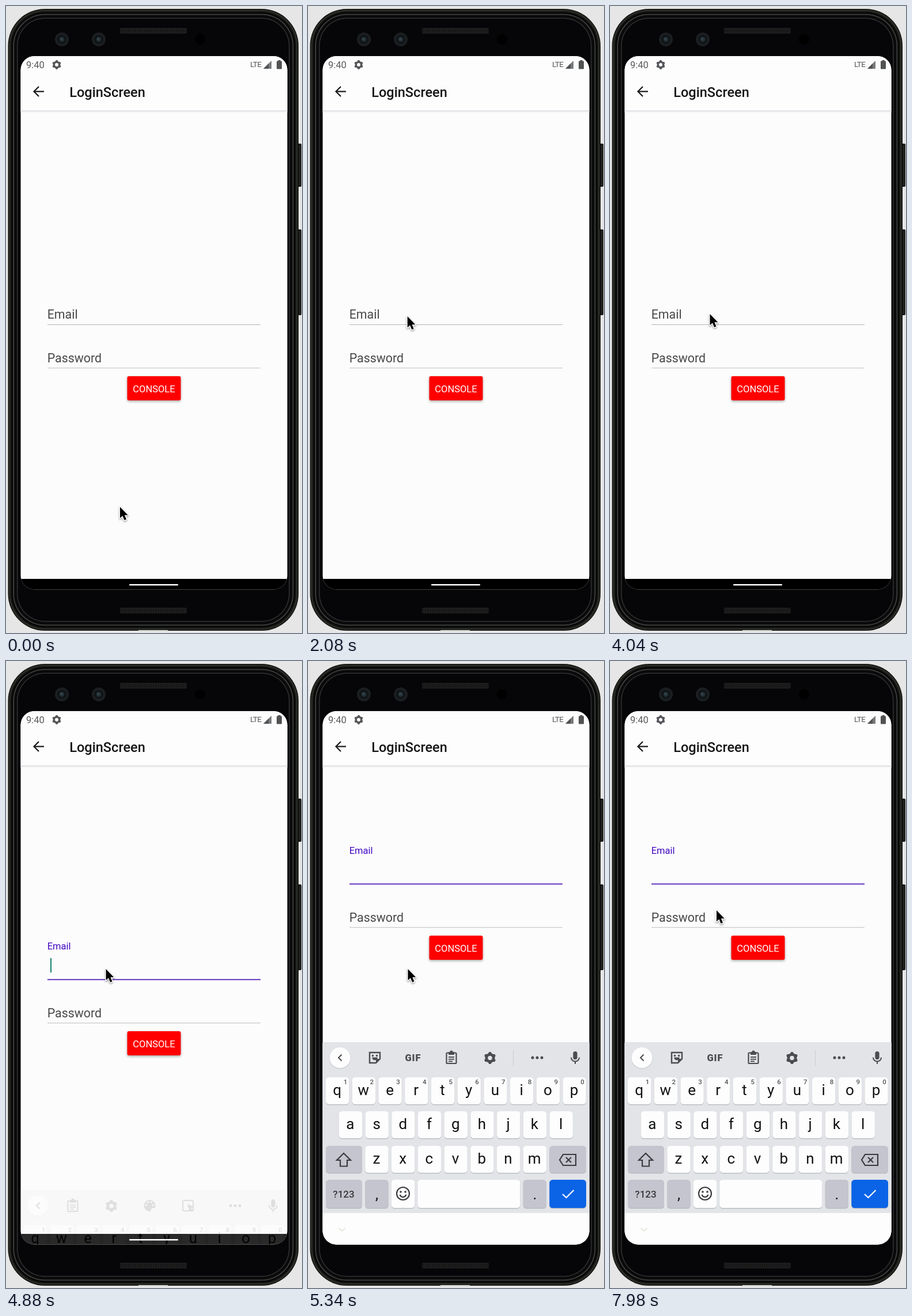
Animation, 514 px wide and 1089 px high, one loop 8000 ms. Source, as an HTML page with a canvas:

```html
<!DOCTYPE html>
<html lang="en">
<head>
<meta charset="utf-8">
<title>Login screen</title>
<style>
html, body { margin: 0; width: 100%; height: 100%; overflow: hidden; background: #e6e6e6; }
canvas { display: block; }
</style>
</head>
<body>
<canvas id="stage" width="514" height="1089"></canvas>
<script>
const W = 514, H = 1089, LOOP = 8000;
const FOCUS = 4430, KEYS_START = 4804, KEYS_TIME = 531, RESIZE = 5020;
const INK = '#4b4c4f';
const stage = document.getElementById('stage').getContext('2d');
let g = stage;

const clamp = v => Math.max(0, Math.min(1, v));
const smooth = v => v * v * (3 - 2 * v);
const mix = (a, b, u) => a + (b - a) * u;

function layer(draw) {
  const c = document.createElement('canvas');
  c.width = W;
  c.height = H;
  g = c.getContext('2d');
  draw();
  g = stage;
  return c;
}

function rect(x, y, w, h, fill) {
  g.fillStyle = fill;
  g.fillRect(x, y, w, h);
}

function round(x, y, w, h, r, fill) {
  g.fillStyle = fill;
  g.beginPath();
  g.roundRect(x, y, w, h, r);
  g.fill();
}

function disc(x, y, r, fill) {
  g.fillStyle = fill;
  g.beginPath();
  g.arc(x, y, r, 0, 7);
  g.fill();
}

function trace(points, closed) {
  g.beginPath();
  points.forEach(([x, y], i) => i ? g.lineTo(x, y) : g.moveTo(x, y));
  if (closed) g.closePath();
}

function line(points, color, width = 2, closed = false) {
  trace(points, closed);
  g.strokeStyle = color;
  g.lineWidth = width;
  g.stroke();
}

function text(s, x, y, size, color, weight = 400, align = 'left') {
  g.font = `${weight} ${size}px Roboto, sans-serif`;
  g.textAlign = align;
  g.fillStyle = color;
  g.fillText(s, x, y);
}

function shadowed(blur, dy, color, draw) {
  g.save();
  g.shadowBlur = blur;
  g.shadowOffsetY = dy;
  g.shadowColor = color;
  draw();
  g.restore();
}

// six teeth, one pointing straight up
function gear(x, y, r, color) {
  g.beginPath();
  for (let i = 0; i < 24; i++) {
    const a = (i + 1.5) * Math.PI / 12, d = i % 4 < 2 ? r : r * 0.8;
    g.lineTo(x + d * Math.cos(a), y + d * Math.sin(a));
  }
  g.closePath();
  g.moveTo(x + r * 0.36, y);
  g.arc(x, y, r * 0.36, 0, 7);
  g.fillStyle = color;
  g.fill('evenodd');
}

function drawPhone() {
  rect(0, 0, W, H, '#e6e6e6');
  for (const [y, h] of [[239, 75], [388, 149]]) {
    round(505, y, 8, h, 2, '#141512');
    rect(510, y + 2, 1, h - 4, '#3b3c3a');
  }
  const rings = [
    [0, '#11120f'], [1.5, '#2b2d28'], [4, '#151713'], [6, '#060606'],
    [8.5, '#303130'], [9.5, '#454645'], [10.5, '#0a0a0a'],
    [15.5, '#303132'], [17, '#060608']
  ];
  for (const [d, color] of rings)
    round(3.5 + d, 5 + d, 504.5 - 2 * d, 1080 - 2 * d, 64 - d, color);
  for (const y of [38, 1045]) {
    round(198, y, 116, 10, 2, '#1d1d1e');
    for (let x = 200; x < 313; x += 4) rect(x, y + 2, 1, 6, '#111112');
  }
  for (const x of [97, 161]) {
    disc(x, 58, 12, '#1c1f21');
    disc(x, 58, 8, '#101517');
    disc(x, 58, 4, '#263238');
    disc(x - 1, 57, 1.5, '#3c4e55');
  }
  disc(337, 58, 9, '#000');
  rect(230, 1084, 51, 2, '#d9dbd5');
}

function drawHeader() {
  rect(25, 87, 464, 95, '#fdfdfd');
  text('9:40', 35, 108, 16.5, '#58595b');
  gear(88, 102, 8, '#55575a');
  g.letterSpacing = '-0.6px';
  text('LTE', 424, 106, 13.5, '#55575a');
  g.letterSpacing = '0px';
  trace([[447, 109], [461, 95], [461, 109]], true);
  g.fillStyle = '#77797b';
  g.fill();
  trace([[447, 109], [456, 100], [456, 109]], true);
  g.fillStyle = '#505254';
  g.fill();
  round(470, 95.5, 9, 14, 1, '#505254');
  rect(472.5, 94, 4, 2, '#505254');
  line([[66, 148.5], [48.5, 148.5]], '#161616', 2.2);
  line([[57, 140], [48.5, 148.5], [57, 157]], '#161616', 2.2);
  text('LoginScreen', 110.2, 158, 23.56, '#161618', 500);
  rect(25, 181, 464, 1, '#eaeaed');
  rect(25, 182, 464, 1, '#dddde3');
  rect(25, 183, 464, 2, '#f3f3f5');
}

function drawForm(t) {
  const u = smooth(clamp((t - FOCUS) / 150));
  const focused = t >= FOCUS;
  const shift = t >= RESIZE ? -166 : 0;
  g.save();
  g.translate(0, shift);
  text('Email', 71.7, mix(543, 501, u), mix(21.4, 16.5, u), focused ? '#4006c2' : '#484848');
  if (u < 1) rect(72, 553, 370, 1, '#b5b5b5');
  if (focused) {
    g.globalAlpha = u;
    rect(72, 552.5, 370, 1.7, '#4a18b2');
    g.globalAlpha = 1;
    if ((t - FOCUS) % 1000 < 500) rect(77, 516, 2, 25, '#12806f');
  }
  text('Password', 71.7, 619, 21.4, '#484848');
  rect(72, 628.3, 370, 1, '#bcbcbf');
  shadowed(4, 2, 'rgba(0,0,0,.32)', () => round(210.5, 643, 93, 42, 3, '#fe0000'));
  text('CONSOLE', 257, 670.5, 16.5, '#fff', 400, 'center');
  g.restore();
}

function key(x, y, w, h = 47, fill = '#fdfdfd') {
  round(x, y + 1.3, w, h, 5.5, '#b4b6bd');
  round(x, y, w, h, 5.5, fill);
}

function sticker(x) {
  line([[x + 9, 691], [x + 9, 680], [x - 9, 680], [x - 9, 698], [x + 2, 698], [x + 9, 691]], INK, 2.4, true);
  trace([[x + 2, 691], [x + 9, 691], [x + 2, 698]], true);
  g.fillStyle = INK;
  g.fill();
  disc(x - 3.5, 685.5, 1.7, INK);
  disc(x + 3.5, 685.5, 1.7, INK);
  g.beginPath();
  g.arc(x, 688.5, 4.8, 0, Math.PI);
  g.fill();
}

function clipboard(x) {
  g.strokeStyle = INK;
  g.lineWidth = 2.2;
  g.beginPath();
  g.roundRect(x - 8.5, 680.5, 17, 18.5, 1.5);
  g.stroke();
  round(x - 5, 679, 10, 5, 1, INK);
  disc(x, 679, 2.6, INK);
  for (const [y, w] of [[687, 10], [690.7, 10], [694.4, 7]]) rect(x - 5, y, w, 1.9, INK);
}

function palette(x) {
  disc(x, 689, 10, INK);
  for (const [dx, dy] of [[-6, -1], [-3, -6], [3, -6], [6, -1]])
    disc(x + dx, 689 + dy, 1.7, '#e2e4e8');
  disc(x + 6, 697, 4, '#e2e4e8');
}

function sheet(x) {
  g.strokeStyle = INK;
  g.lineWidth = 2.2;
  g.beginPath();
  g.roundRect(x - 9, 680, 18, 18, 2);
  g.stroke();
  trace([[x - 1, 686], [x + 10, 691], [x + 5, 693], [x + 10, 699], [x + 2, 697]], true);
  g.fillStyle = INK;
  g.fill();
}

function mic(x) {
  round(x - 3.6, 678, 7.2, 14, 3.6, INK);
  g.strokeStyle = INK;
  g.lineWidth = 2;
  g.beginPath();
  g.arc(x, 688.5, 7, 0, Math.PI);
  g.stroke();
  rect(x - 1, 695, 2, 5, INK);
}

function drawKeyboard(ready) {
  rect(25, 662, 464, 296, '#e2e4e8');
  rect(25, 958, 464, 56, '#fdfdfd');
  rect(25, 958, 464, 1, '#e9eae6');
  shadowed(2, 1, 'rgba(0,0,0,.15)', () => disc(55.5, 689, 18, '#fdfdfd'));
  line([[58.5, 683.5], [53, 689], [58.5, 694.5]], INK, 2);
  if (ready) {
    sticker(116);
    g.letterSpacing = '0.8px';
    text('GIF', 182.4, 695, 16.5, INK, 900, 'center');
    g.letterSpacing = '0px';
    clipboard(249);
    gear(316, 689.5, 10.5, INK);
    rect(356, 676, 1, 27, '#c9cbd0');
  } else {
    clipboard(116);
    gear(183, 689.5, 10.5, INK);
    palette(249.5);
    sheet(316);
  }
  for (const d of [-8, 0, 8]) disc(398 + d, 689, 2.5, INK);
  mic(464);

  const dark = '#101113', grey = '#c4c5ce', pitch = 45.72;
  const rows = [['qwertyuiop', 31, 723], ['asdfghjkl', 53.8, 782], ['zxcvbnm', 99.3, 842]];
  for (const [letters, x0, y] of rows)
    [...letters].forEach((ch, i) => {
      const x = x0 + i * pitch;
      key(x, y, 40.3);
      text(ch, x + 19.6, y + 31, 26, dark, 400, 'center');
      if (y === 723) text((i + 1) % 10, x + 34, 735, 11.5, '#55565a', 500, 'center');
    });

  key(31, 842, 63, 47, grey);
  line([[62, 855], [74, 867], [68, 867], [68, 877.5], [56, 877.5], [56, 867], [50, 867]], '#3a3b3f', 2.2, true);
  key(419.3, 842, 63.7, 47, grey);
  line([[443, 857], [465, 857], [465, 876], [443, 876], [437, 866.5]], '#3a3b3f', 2.2, true);
  line([[448, 862], [457, 871]], '#3a3b3f', 2.2);
  line([[457, 862], [448, 871]], '#3a3b3f', 2.2);

  key(31, 901, 63, 49, grey);
  text('?123', 62, 932, 17, '#37383c', 500, 'center');
  key(99.3, 901, 40.3, 49, grey);
  text(',', 119.5, 935, 26, dark, 400, 'center');
  key(145, 901, 40.3, 49);
  g.strokeStyle = '#3a3b3f';
  g.lineWidth = 2.2;
  g.beginPath();
  g.arc(165, 925, 11, 0, 7);
  g.stroke();
  disc(161, 922, 1.8, '#3a3b3f');
  disc(169, 922, 1.8, '#3a3b3f');
  g.beginPath();
  g.arc(165, 925.5, 5.5, 0.25, Math.PI - 0.25);
  g.stroke();
  key(190.3, 901, 178, 49);
  key(373.7, 901, 40.3, 49, grey);
  text('.', 394, 935, 26, dark, 400, 'center');
  key(419.3, 901, 63.7, 49, '#0b63e6');
  line([[442, 926], [448.5, 932], [461.5, 919]], '#fff', 2.2);
  line([[53.5, 985], [59, 990], [64.5, 985]], '#d9dbcb', 1.2);
}

// time, x, y of the pointer tip
const route = [
  [0, 198, 869], [100, 198, 869], [1150, 160, 602], [1400, 160, 602],
  [2200, 173.5, 534], [5350, 173.5, 534], [6150, 182.5, 446], [6700, 182.5, 446],
  [7300, 185, 432], [LOOP, 185, 432]
];

function pointerAt(t) {
  const i = route.findIndex(p => p[0] > t);
  const a = route[i - 1], b = route[i];
  const u = smooth((t - a[0]) / (b[0] - a[0]));
  return [mix(a[1], b[1], u), mix(a[2], b[2], u)];
}

function drawPointer(x, y) {
  g.save();
  g.translate(x, y);
  trace([[0, 1], [0, 20.5], [4.4, 16.5], [7.6, 24], [11, 22.6], [7.9, 15.2], [13.8, 15.2]], true);
  g.lineJoin = 'round';
  g.strokeStyle = '#fff';
  g.lineWidth = 3;
  shadowed(3, 1.5, 'rgba(0,0,0,.4)', () => g.stroke());
  g.fillStyle = '#000';
  g.fill();
  g.restore();
}

const phone = layer(drawPhone);
const header = layer(drawHeader);
const boards = [false, true].map(ready => layer(() => drawKeyboard(ready)));

function render(t) {
  g.drawImage(phone, 0, 0);
  g.save();
  g.beginPath();
  g.roundRect(25.5, 87, 463, 926.5, 24);
  g.clip();
  const resized = t >= RESIZE;
  rect(25, 87, 464, 927, '#fcfcfc');
  if (resized) rect(25, 664, 464, 350, '#f5f5f5');
  g.drawImage(header, 0, 0);
  drawForm(t);
  if (!resized) rect(25, 995, 464, 19, '#000');

  const u = clamp((t - KEYS_START) / KEYS_TIME);
  if (u > 0) {
    g.globalAlpha = clamp((u - 0.08) / 0.4);
    g.drawImage(boards[resized ? 1 : 0], 0, Math.round(351 * (1 - u) ** 2));
    g.globalAlpha = 1;
  }
  round(214, 1004, 85, 2.4, 1.2, '#fdfdfd');
  if (resized) {
    for (let i = 0; i < 15; i++)
      rect(446.5 + i % 5 * 4, 981 + Math.floor(i / 5) * 3, 2, 1.6, '#fdfdfd');
  }
  g.restore();
  drawPointer(...pointerAt(t));
}

const start = performance.now();
function tick() {
  render((performance.now() - start) % LOOP);
  requestAnimationFrame(tick);
}
tick();
</script>
</body>
</html>
```
